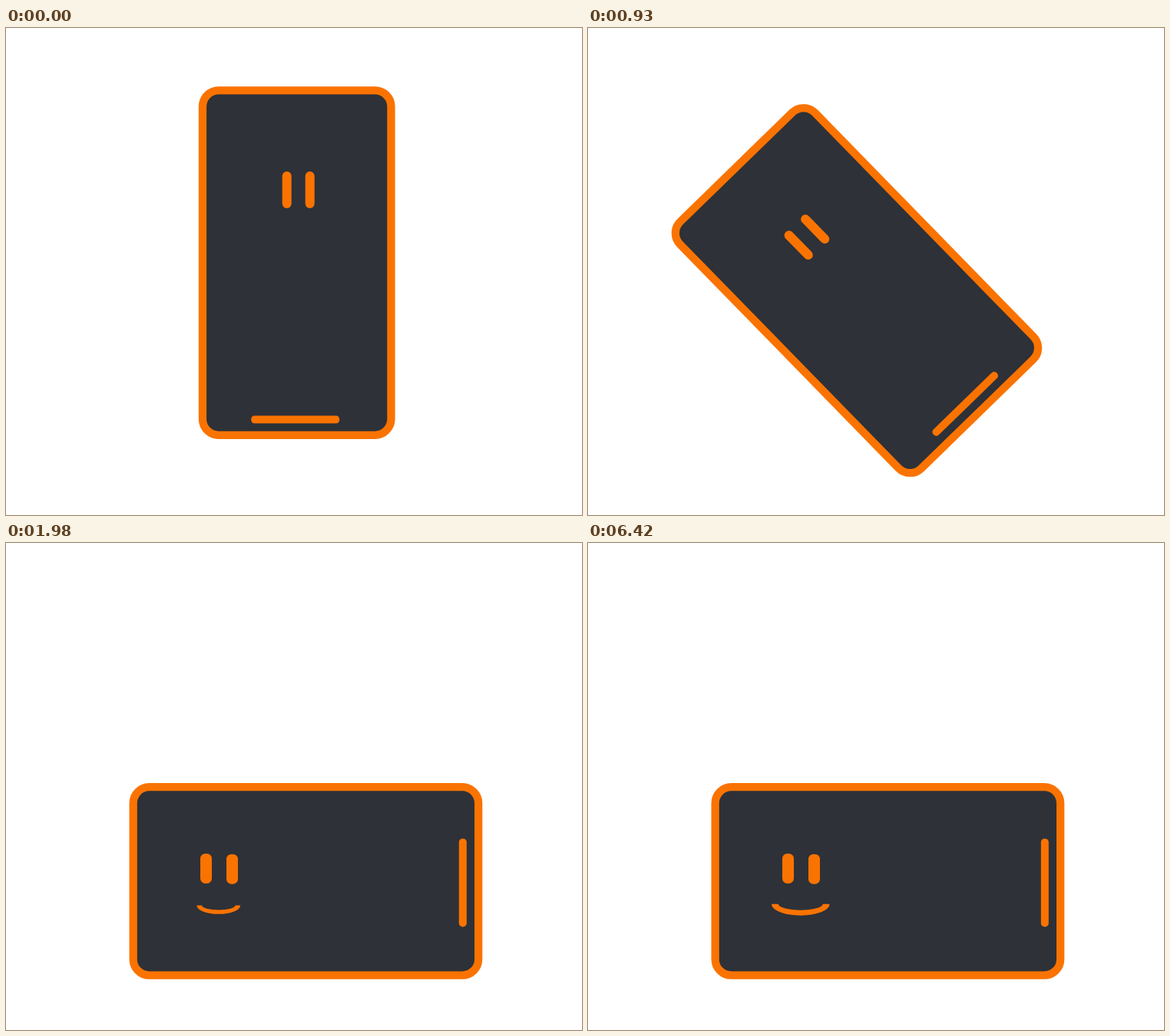
These frames come from a looping animation (750x635 px, 7.44 s). An HTML page:

```html
<!DOCTYPE html>
<html lang="en">
<head>
<meta charset="utf-8">
<title>Phone face</title>
<style>
  html, body { margin: 0; width: 100%; height: 100%; overflow: hidden; background: #fff; }
  svg { display: block; width: 100vw; height: 100vh; fill: #fa7300; }
</style>
</head>
<body>
<svg viewBox="0 0 750 635">
  <g id="phone">
    <rect x="-122.75" y="-224.75" width="245.5" height="449.5" rx="21" fill="#2e3138" stroke="#fa7300" stroke-width="10.3"/>
    <rect x="-59.5" y="199.4" width="115" height="10" rx="4.5"/>
    <rect id="leftEye"/>
    <rect id="rightEye"/>
  </g>
  <path id="mouth" d="M-37.8 -7.5A37.8 15 0 0 0 37.8 -7.5H29A29 8 0 0 1 -29 -7.5Z"/>
</svg>
<script>
const LOOP = 7440, STEP = 30;
const [phone, leftEye, rightEye, mouth] =
  ["phone", "leftEye", "rightEye", "mouth"].map(id => document.getElementById(id));

// Eye poses relative to the phone centre: before and after the turn.
const LEFT = [{ x: -13, y: -95.2, w: 12, h: 48, r: 6, turn: 0 },
              { x: 16.5, y: -129.9, w: 15, h: 39, r: 6.5, turn: 90 }];
const RIGHT = [{ x: 17, y: -95.2, w: 12, h: 48, r: 6, turn: 0 },
               { x: 15.7, y: -95.9, w: 15, h: 39, r: 6.5, turn: 90 }];

const lerp = (a, b, p) => a + (b - a) * p;
const progress = (t, from, to) => Math.min(1, Math.max(0, (t - from) / (to - from)));
const easeOut = p => 1 - (1 - p) ** 2;
const easeInOut = p => p < 0.5 ? 4 * p ** 3 : 1 - 4 * (1 - p) ** 3;

// Eye height factor: closes to 10% halfway through the blink.
const blink = (t, from, to) => 0.1 + 0.9 * Math.abs(1 - 2 * progress(t, from, to));

function setAttributes(node, values) {
  for (const name in values) node.setAttribute(name, values[name]);
}

function drawEye(node, [start, end], p, open) {
  const at = key => lerp(start[key], end[key], p);
  const w = at("w"), h = at("h");
  setAttributes(node, {
    x: -w / 2, y: -h / 2, width: w, height: h, rx: at("r"),
    transform: `translate(${at("x")} ${at("y")}) rotate(${at("turn")}) scale(1 ${open})`
  });
}

function draw(t) {
  // Lean right, then swing onto the side while sliding right.
  const lean = 9.7 * easeOut(progress(t, 540, 676));
  const angle = lerp(lean, -90, easeInOut(progress(t, 676, 1170)));
  const slide = 156.7 * Math.max(0, (-angle - 7) / 83);
  phone.setAttribute("transform",
    `translate(${373.6 + slide} 446) rotate(${angle}) translate(5.1 -139.9)`);

  const both = Math.min(blink(t, 0, 180),
    ...[1470, 2760, 4560].map(from => blink(t, from, from + 120)));
  const wink = blink(t, 6300, 6420);
  const turn = easeInOut(progress(t, 930, 1170));
  drawEye(leftEye, LEFT, turn, both);
  drawEye(rightEye, RIGHT, turn, Math.min(both, wink));

  mouth.setAttribute("transform",
    `translate(276.8 478.2) scale(${progress(t, 1890, 2010)})`);
}

const began = performance.now();
function tick() {
  const t = (performance.now() - began) % LOOP;
  draw(Math.floor(t / STEP) * STEP);
  requestAnimationFrame(tick);
}
tick();
</script>
</body>
</html>
```
